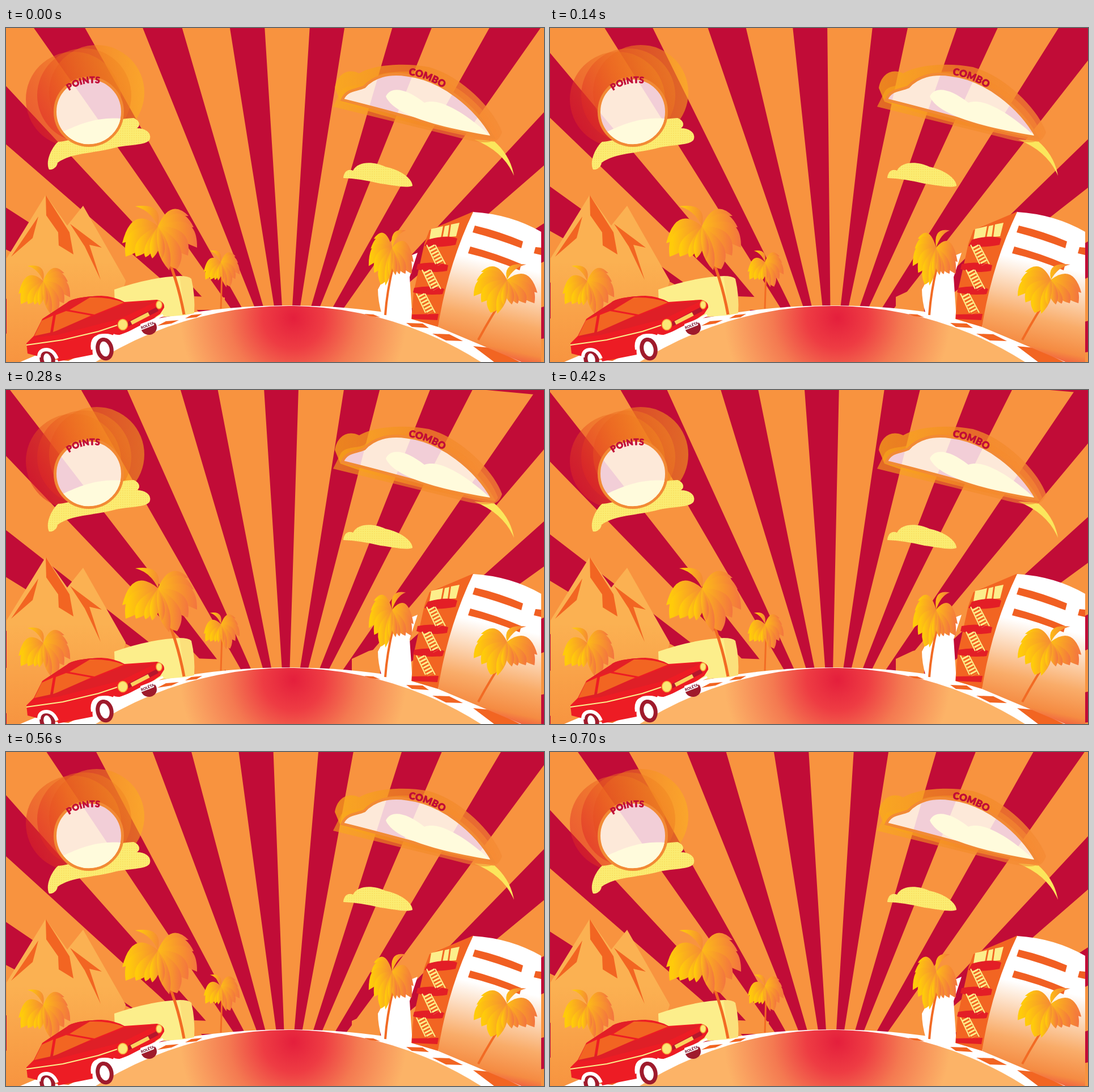
Animation of 949x590 px, one loop 770 ms. Source, as an HTML page:

```html
<!DOCTYPE html>
<html lang="en">
<head>
<meta charset="utf-8">
<style>
  html, body { margin: 0; width: 100%; height: 100%; overflow: hidden; background: #c10c37; }
  svg { display: block; width: 949px; height: 590px; }
  text { font-family: Lato, "Open Sans", sans-serif; font-weight: 900; fill: #c10c37; }
  .label { stroke: #c10c37; stroke-width: .7px; }
</style>
</head>
<body>
<svg viewBox="0 0 949 590">
  <defs>
    <linearGradient id="west"><stop offset=".1" stop-color="#ffcb0a"/><stop offset="1" stop-color="#f58a35"/></linearGradient>
    <linearGradient id="east"><stop stop-color="#fdbc17"/><stop offset="1" stop-color="#f3753f"/></linearGradient>
    <linearGradient id="westFlip" href="#west" x1="1" x2="0"/>
    <linearGradient id="eastFlip" href="#east" x1="1" x2="0"/>
    <linearGradient id="haloRed" x1="0" y1=".8" x2="1" y2=".2"><stop stop-color="#dd1f27"/><stop offset=".5" stop-color="#e9601f"/><stop offset="1" stop-color="#f28c22"/></linearGradient>
    <linearGradient id="haloGold"><stop stop-color="#ea5c20"/><stop offset="1" stop-color="#fbb51c"/></linearGradient>
    <linearGradient id="cloudHalo"><stop stop-color="#f9ad18"/><stop offset=".5" stop-color="#f28a25"/><stop offset="1" stop-color="#f58a35"/></linearGradient>
    <linearGradient id="hill" x1="0" y1="0" x2="0" y2="1"><stop offset=".4" stop-color="#fbb152"/><stop offset="1" stop-color="#f79440"/></linearGradient>
    <linearGradient id="facade" x1=".55" y1="0" x2=".4" y2="1"><stop offset=".33" stop-color="#fff"/><stop offset=".7" stop-color="#f9ac69"/><stop offset=".88" stop-color="#f58b42"/><stop offset="1" stop-color="#ee3f3b"/></linearGradient>
    <radialGradient id="road" gradientUnits="userSpaceOnUse" cx="507" cy="512" r="200">
      <stop stop-color="#e41f3c"/><stop offset=".27" stop-color="#ee3c43"/><stop offset=".57" stop-color="#f47a51"/><stop offset="1" stop-color="#fcb367"/>
    </radialGradient>
    <pattern id="mesh" width="4" height="4" patternUnits="userSpaceOnUse">
      <path fill="#fbec72" d="M0 0h4v4H0z"/><circle cx="2" cy="2" r=".8" fill="#f9d653"/>
    </pattern>
    <path id="pointsArc" d="M111 111Q136 92 172 99"/>
    <path id="comboArc" d="M710 83Q745 87 782 113"/>
    <circle id="sunBody" cx="146" cy="148" r="59.5"/>
    <path id="comboBody" d="M593 127C601 108 616 111 632 104C648 86 674 78 707 83C768 90 829 139 859 193C792 182 680 148 593 127z"/>
    <mask id="aroundBodies">
      <path fill="#fff" d="M0 0H949V300H0z"/><use href="#sunBody"/><use href="#comboBody"/>
    </mask>
    <g id="crown"></g>
    <g id="crownFlip"></g>
  </defs>

  <g id="sky"><path fill="#f8933f" d="M-1200-667H1200V667H-1200z"/></g>

  <!-- score sun -->
  <g mask="url(#aroundBodies)">
    <circle cx="119" cy="126" r="84" fill="url(#haloRed)" opacity=".5"/>
    <circle cx="160" cy="114" r="84" fill="url(#haloGold)" opacity=".55"/>
    <circle cx="138" cy="119" r="83" fill="url(#haloRed)" opacity=".5"/>
  </g>
  <path fill="url(#mesh)" d="M76 250C69 237 80 211 92 201C138 199 154 162 225 159C236 163 238 173 231 177C249 177 258 188 253 198C244 208 219 205 190 212C153 222 116 220 91 238C90 247 81 251 76 250z"/>
  <use href="#sunBody" fill="#fff" fill-opacity=".8" stroke="#f28a35" stroke-width="5"/>
  <path fill="#fffbdc" d="M101 183C130 170 160 157 202 160A57 57 0 0 1 101 183z"/>
  <text class="label" font-size="15.5"><textPath href="#pointsArc">POINTS</textPath></text>

  <!-- combo cloud -->
  <path fill="#fbe65c" d="M826 197L860 199Q890 225 896 261Q878 218 826 197z"/>
  <g fill="url(#cloudHalo)" mask="url(#aroundBodies)">
    <path opacity=".75" d="M580 106C584 82 602 70 623 80C650 64 704 61 746 69C806 86 862 146 875 184C872 193 868 198 860 201C780 184 670 160 590 130z"/>
    <path opacity=".6" d="M577 139L591 111C601 99 621 103 632 97C652 75 710 73 750 82C810 107 853 150 868 190C859 212 820 199 780 189z"/>
  </g>
  <use href="#comboBody" fill="#fff" fill-opacity=".8" stroke="#f28a35" stroke-width="5"/>
  <path fill="#fffbdc" d="M670 121C678 103 704 105 738 132C766 122 812 152 854 190C782 178 686 158 670 121z"/>
  <text class="label" font-size="17"><textPath href="#comboArc">COMBO</textPath></text>
  <path fill="url(#mesh)" d="M595 265C596 251 606 249 612 252C621 234 650 236 669 245C695 250 717 266 717 279C704 283 685 278 661 275Q624 266 595 265z"/>

  <!-- mountains and distant blocks -->
  <path fill="url(#hill)" d="M1 407L70 295L108 349L136 314L211 446V590H1z"/>
  <g fill="#f26522">
    <path d="M70 295L112 361L119 400L93 384L92 361L71 331zM57 333L47 371L9 404z"/>
    <path d="M113 346L169 388L147 383L167 445L139 386z"/>
  </g>
  <path fill="#f8933f" d="M211 448L240 464V510H190zM332 474L386 476V498H330zM610 475L640 461L660 456V505L610 496z"/>
  <path fill="#fff" d="M25 590A1179 1179 0 0 1 944 577V590z"/>
  <circle cx="498" cy="1124" r="633" fill="url(#road)"/>
  <path fill="#f26522" d="M267 526L282 518L305 516L292 522zM316 513L327 507L346 505L336 511zM75 585L90 576L140 574L110 588zM632 505L648 506L660 511L642 509zM706 521L735 522L746 530L716 528zM752 540L782 541L806 553L776 552zM824 562L856 565L907 590H861z"/>
  <path fill="#fcee8b" d="M191 462Q254 440 308 438L318 507L258 512L192 490z"/>
  <path fill="#fbe07b" d="M306 438Q322 438 327 443Q334 473 332 504L316 507z"/>

  <!-- buildings -->
  <path fill="#fff" d="M656 462Q679 414 726 397L712 440L717 514L663 506Q656 482 656 462z"/>
  <path fill="#f26522" d="M747 357L825 324L796 400L762 528L715 514L719 467L738 381z"/>
  <path fill="#fcee8b" d="M750 355L771 350L767 371L747 373zM774 350L782 348L779 369L770 371zM785 347L800 344L794 368L782 369z"/>
  <path fill="#e31e26" d="M744 374Q780 364 796 372L793 383Q760 389 738 385zM726 417Q752 411 780 419L778 429Q750 434 724 426zM720 459Q750 453 773 461L770 470Q742 473 718 467zM716 506L763 505L761 516L716 514z"/>
  <g id="stairs" fill="none" stroke="#fcee8b"></g>
  <path fill="url(#facade)" d="M824 325Q890 329 944 360V590H909L838 560L762 528Q779 420 824 325z"/>
  <path fill="#f15f22" d="M827 349Q870 359 912 377L909 389Q865 372 823 361zM819 386Q865 398 909 417L906 428Q861 409 815 398zM934 387L944 388V401L931 398z"/>
  <g id="palms"></g>

  <!-- car -->
  <ellipse cx="252" cy="529" rx="14" ry="13" fill="#9f1b2c"/>
  <path fill="#ed1c24" d="M36 557L49 544L64 514L108 485Q118 475 168 473Q191 474 209 484L266 480Q280 483 279 494L272 505L238 528L193 545Q183 538 164 541Q150 546 153 577L92 589Q87 566 69 566L57 580L38 575z"/>
  <path fill="#df1f27" d="M158 507L211 487L266 482Q230 501 200 514L91 542L49 547L62 540z"/>
  <path fill="#e21f27" d="M64 514L108 485Q118 475 168 473L146 477L107 499L86 504z"/>
  <path fill="#f26522" d="M112 498L148 476Q182 475 208 485L156 506zM88 507L106 500L150 508L91 534L83 537zM63 517L83 508L78 538L50 544z"/>
  <path fill="none" stroke="#fcee8b" stroke-width="2" d="M36 560L100 551L163 536L196 525"/>
  <path fill="#b5172c" d="M215 519L266 493L269 500L216 527z"/>
  <path fill="none" stroke="#fbd25f" stroke-width="7" d="M221 521L252 505"/>
  <g fill="#fce876" stroke="#f7a93b" stroke-width="1.5">
    <ellipse cx="206" cy="524" rx="8.5" ry="9.5"/><ellipse cx="270" cy="489" rx="5" ry="7"/>
  </g>
  <path fill="none" stroke="#fff" stroke-width="4" d="M189 542Q198 547 213 540L277 507"/>
  <path fill="#fff" d="M237 523L263 513L261 525L238 534z"/>
  <text font-size="6.5" transform="translate(239 532) rotate(-22)" style="fill:#7b1730">ROLÉTA</text>
  <g fill="#fff" stroke="#9f1b2c" stroke-width="7">
    <ellipse cx="174" cy="567" rx="12" ry="17" transform="rotate(-13 174 567)"/>
    <ellipse cx="73" cy="585" rx="10" ry="14" transform="rotate(-13 73 585)"/>
  </g>
  <path fill="none" stroke="#fff" stroke-width="6" d="M153 568Q149 543 173 544Q188 545 193 561M58 582Q58 568 72 568Q84 569 90 584"/>
</svg>
<script>
const $ = id => document.getElementById(id);
const add = (id, markup) => $(id).insertAdjacentHTML('beforeend', markup);

// Sunburst: evenly spaced rays, squeezed horizontally
const RAY_STEP = 14, HALF_RAY = 3.03, SQUEEZE = 0.897;
const rim = degrees => {
  const a = degrees * Math.PI / 180;
  return `${(1500 * SQUEEZE * Math.sin(a)).toFixed(1)} ${(-1500 * Math.cos(a)).toFixed(1)}`;
};
let rays = '';
for (let i = -8; i < 8; i++) {
  const mid = (i + 0.5) * RAY_STEP;
  rays += `M0 0L${rim(mid - HALF_RAY)}L${rim(mid + HALF_RAY)}z`;
}
add('sky', `<path fill="#c10c37" d="${rays}"/>`);

// Leaves are two curves from the stem: outer control, tip, inner control
const leaves = [
  ['278 308', '228 315', '254 321'],
  ['290 300', '322 332', '296 332'],
  ['308 304', '331 352', '306 352'],
  ['338 322', '337 388', '303 375'],
  ['222 312', '205 380', '246 370'],
  ['202 345', '211 404', '258 388'],
  ['330 350', '321 402', '282 390'],
  ['328 385', '302 426', '270 420'],
  ['218 372', '229 404', '264 396'],
  ['236 390', '246 405', '267 396'],
  ['298 390', '288 428', '258 396'],
  ['245 383', '258 407', '280 387'],
  ['262 380', '275 408', '288 387']
];
for (const flip of ['', 'Flip']) {
  add('crown' + flip, leaves.map(([outer, tip, inner]) => {
    const isWest = (parseInt(tip) < 268) !== Boolean(flip);
    return `<path fill="url(#${isWest ? 'west' : 'east'}${flip})" d="M268 350Q${outer} ${tip}Q${inner} 268 350z"/>`;
  }).join(''));
}

const palm = (x, y, sx, sy, trunk, width) => add('palms',
  `<path d="${trunk}" fill="none" stroke="#f26b24" stroke-width="${width}"/>
   <use href="#crown${sx < 0 ? 'Flip' : ''}" transform="translate(${x} ${y}) scale(${sx} ${sy}) translate(-270 -370)"/>`);
palm(270, 370, 1, 1, 'M276 385Q302 440 314 506', 5);
palm(67, 462, 0.69, 0.76, 'M78 475Q86 500 84 525', 4);
palm(380, 425, 0.48, 0.57, 'M381 432L379 496', 3);
palm(680, 405, -0.6, 0.86, 'M683 420Q672 465 669 507', 4);
palm(882, 460, -0.85, 0.77, 'M879 474Q854 512 833 551', 4);

for (const [x, y] of [[742, 383], [734, 427], [724, 469]]) {
  add('stairs', `<path stroke-width="2" d="M${x} ${y}l16 34M${x + 15} ${y}l18 34"/>
    <path stroke-width="12" stroke-dasharray="3 3" d="M${x + 8} ${y + 2}l17 32"/>`);
}

// The sky swings out, rests, and swings back
const STEP = 70;
const swing = [0, 1.37, 2.95, 4.4, 5.35, 5.35, 4.8, 2.95, 1.37, 0.4, 0];
function draw() {
  const step = Math.floor(performance.now() / STEP) % swing.length;
  $('sky').setAttribute('transform', `translate(496 637) rotate(${swing[step]})`);
  requestAnimationFrame(draw);
}
draw();
</script>
</body>
</html>
```
